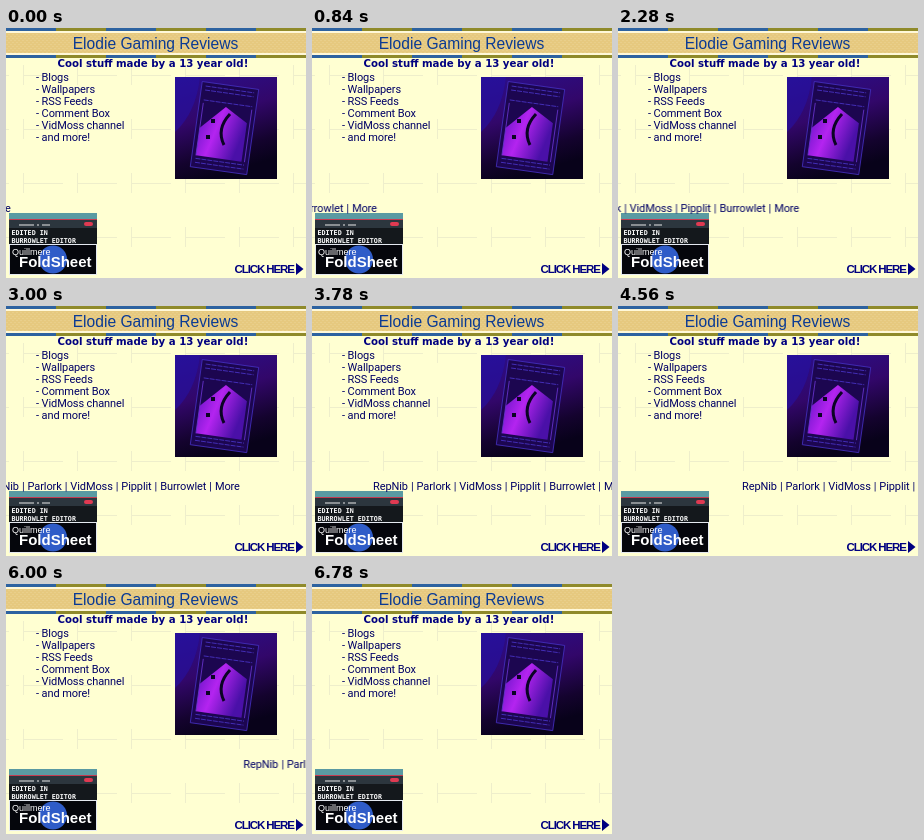
An HTML page for the animation above (6.84 s loop, 300 px wide and 250 px high).

```html
<!DOCTYPE html>
<html lang="en">
<head>
<meta charset="utf-8">
<title>Gaming reviews banner</title>
<style>
  html, body { margin: 0; width: 100%; height: 100%; overflow: hidden; background: #ffffd2; }
  svg { display: block; width: 300px; height: 250px; }
  text { white-space: pre; }
  .body { font: 11px Roboto, "Noto Sans", sans-serif; letter-spacing: -.1px; fill: #000066; }
  .title { font: 15.6px "Liberation Sans", Arial, sans-serif; fill: #0a3a94; text-anchor: middle; }
  .lead { font: bold 10.2px "DejaVu Sans", Verdana, sans-serif; fill: #000080; }
  .pixel { font: bold 6.7px "DejaVu Sans Mono", monospace; fill: #fff; }
  .plain { font: 9px "Liberation Sans", Arial, sans-serif; fill: #fff; }
  .big { font-weight: bold; font-size: 15px; }
  .click { font: bold 11.5px "Liberation Sans", Arial, sans-serif; letter-spacing: -1.1px; fill: #000080; }

  /* The links advance once every 60 ms, at a slightly uneven pace. */
  .links { word-spacing: .4px; animation: scroll 6840ms infinite; }
  @keyframes scroll {
    0%      { transform: translateX(-251px); animation-timing-function: steps(12); }
    10.526% { transform: translateX(-200px); animation-timing-function: steps(12); }
    21.052% { transform: translateX(-145px); animation-timing-function: steps(1); }
    21.929% { transform: translateX(-138px); animation-timing-function: steps(11); }
    31.578% { transform: translateX(-83px); animation-timing-function: steps(12); }
    42.105% { transform: translateX(-33px); animation-timing-function: steps(2); }
    43.859% { transform: translateX(-22px); animation-timing-function: steps(10); }
    52.631% { transform: translateX(41px); animation-timing-function: steps(3); }
    55.263% { transform: translateX(61px); animation-timing-function: steps(9); }
    63.157% { transform: translateX(102px); animation-timing-function: steps(4); }
    66.666% { transform: translateX(124px); animation-timing-function: steps(8); }
    73.684% { transform: translateX(162px); animation-timing-function: steps(5); }
    78.07%  { transform: translateX(183px); animation-timing-function: steps(7); }
    84.21%  { transform: translateX(219px); animation-timing-function: steps(12); }
    94.736% { transform: translateX(274px); animation-timing-function: steps(5); }
    99.122% { transform: translateX(300px); animation-timing-function: steps(1); }
    100%    { transform: translateX(305px); }
  }
</style>
</head>
<body>
<svg viewBox="0 0 300 250">
  <defs>
    <pattern id="paper" width="54" height="54" x="17" y="47" patternUnits="userSpaceOnUse">
      <rect width="54" height="54" fill="#ffffd2"/>
      <path d="M.5 0V10M.5 44V54M0 .5H40" stroke="#eeeecb"/>
    </pattern>
    <pattern id="stripe" width="100" height="3" patternUnits="userSpaceOnUse">
      <rect width="50" height="3" fill="#2d62a0"/>
      <rect x="50" width="50" height="3" fill="#8f8a2a"/>
    </pattern>
    <pattern id="weave" width="4" height="4" patternUnits="userSpaceOnUse">
      <rect width="4" height="4" fill="#e6c97f"/>
      <path d="M0 .5H2M2 2.5H4" stroke="#e9cf8b"/>
    </pattern>
    <linearGradient id="night" x1="0" y1="0" x2=".3" y2="1">
      <stop offset="0" stop-color="#2a0f8c"/>
      <stop offset=".45" stop-color="#32076a"/>
      <stop offset=".8" stop-color="#14032e"/>
      <stop offset="1" stop-color="#08021a"/>
    </linearGradient>
    <linearGradient id="glow" x1="0" y1="0" x2="1" y2=".3">
      <stop offset="0" stop-color="#6a14c8"/>
      <stop offset=".45" stop-color="#b424f0"/>
      <stop offset="1" stop-color="#4a10a8"/>
    </linearGradient>
    <clipPath id="frame"><rect x="169" y="49" width="102" height="102"/></clipPath>
  </defs>

  <rect width="300" height="250" fill="url(#paper)"/>

  <!-- header -->
  <rect width="300" height="30" fill="#fff8d8"/>
  <rect width="300" height="3" fill="url(#stripe)"/>
  <rect y="5" width="300" height="20" fill="url(#weave)"/>
  <g transform="translate(0 27)"><rect width="300" height="3" fill="url(#stripe)"/></g>
  <text class="title" x="149.5" y="21">Elodie Gaming Reviews</text>

  <text class="lead" x="51.5" y="38.5">Cool stuff made by a 13 year old!</text>
  <g class="body">
    <text x="30" y="53">- Blogs</text>
    <text x="30" y="65">- Wallpapers</text>
    <text x="30" y="77">- RSS Feeds</text>
    <text x="30" y="89">- Comment Box</text>
    <text x="30" y="101">- VidMoss channel</text>
    <text x="30" y="113">- and more!</text>
  </g>

  <!-- picture -->
  <g clip-path="url(#frame)">
    <rect x="169" y="49" width="102" height="102" fill="url(#night)"/>
    <path d="M169 49H194Q190 85 169 104Z" fill="#2512a4" opacity=".6"/>
    <g transform="rotate(8 218 100)">
      <rect x="190" y="57" width="57" height="86" fill="#1c0650" stroke="#4530c0" stroke-width=".8"/>
      <path d="M194 103L217 79L240 92V131H194Z" fill="url(#glow)"/>
      <path d="M194 61H243M194 65H243M194 75H243M194 134H243M194 138H243"
            stroke="#4a34c8" stroke-width=".8" stroke-dasharray="5 1"/>
      <path d="M194 78V131M243 78V131" stroke="#6a34d0" stroke-width=".8"/>
    </g>
    <g fill="#0b0424">
      <rect x="205" y="91" width="4" height="4"/>
      <rect x="200" y="107" width="4" height="4"/>
    </g>
    <path d="M224 86Q210 101 218 117" fill="none" stroke="#0b0424" stroke-width="3"/>
  </g>

  <!-- editor badge -->
  <rect x="3" y="185" width="88" height="31" fill="#14181c"/>
  <rect x="3" y="185" width="88" height="6" fill="#5a9aa2"/>
  <rect x="3" y="191" width="88" height="1" fill="#c43a50"/>
  <rect x="3" y="192" width="88" height="8" fill="#2c363e"/>
  <path d="M13 197H28M31 197H33M36 197H44" stroke="#e8e8e8"/>
  <rect x="78" y="194" width="9" height="4" rx="2" fill="#e03a52"/>
  <text class="pixel" x="5.5" y="207">EDITED IN</text>
  <text class="pixel" x="5.5" y="214.5">BURROWLET EDITOR</text>

  <!-- software badge -->
  <rect x="3.5" y="216.5" width="87" height="30" fill="#05060c" stroke="#e4e8f0"/>
  <circle cx="47" cy="231.5" r="14" fill="#2f5cc8"/>
  <text class="plain" x="6" y="227">Quillmere</text>
  <text class="plain big" x="13" y="239">FoldSheet</text>

  <text class="click" x="228.5" y="245">CLICK HERE</text>
  <path d="M290 235L297.5 241L290 247Z" fill="#000080"/>

  <g class="links">
    <text class="body" y="184">RepNib | Parlork | VidMoss | Pipplit | Burrowlet | More</text>
  </g>
</svg>
</body>
</html>
```
